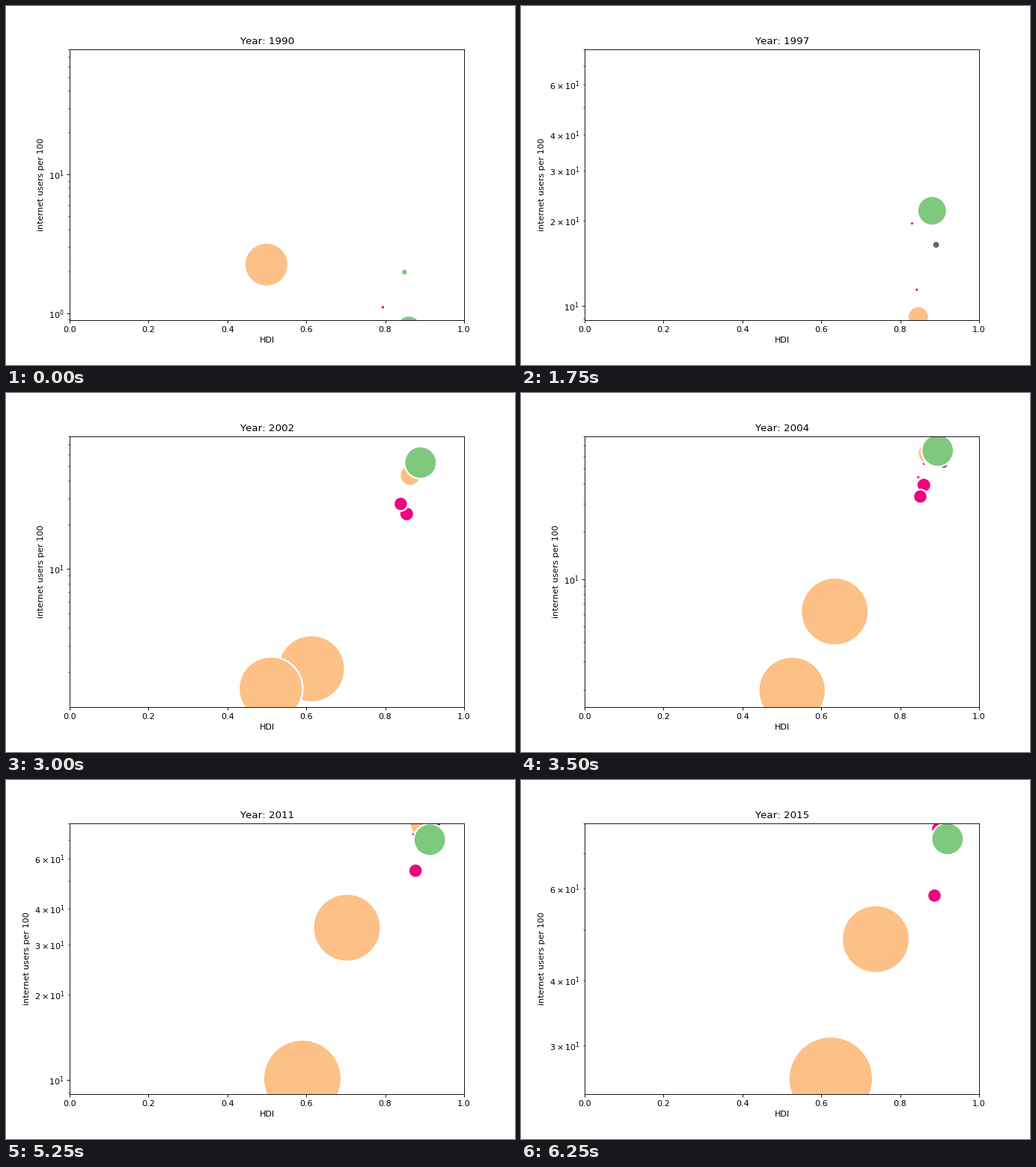
These frames come from a looping animation (680x480 px, 6.5 s). A matplotlib script:

```python
import numpy as np
import matplotlib.pyplot as plt
from matplotlib.animation import FuncAnimation

plt.rcParams["text.kerning_factor"] = 6

FIRST, LAST = 1990, 2015
TOP = 80
PLOT_H = 362
EDGE = 2
GREEN, ORANGE, PINK, GREY = "#7fc97f", "#fdc086", "#f0027f", "#666666"


class Bubble:
    """Follows key points (year, hdi, users); users grow exponentially between."""

    def __init__(self, color, radius, *path, grow=0, cap=99):
        self.color, self.radius, self.grow, self.cap = color, radius, grow, cap
        self.years, self.hdi, users = np.array(path).T
        self.log_users = np.log10(users)

    def spot(self, year):
        x = np.interp(year, self.years, self.hdi)
        y = np.interp(year, self.years, self.log_users,
                      left=np.nan, right=np.nan)
        return x, 10 ** y

    def area(self, year):
        r = min(self.radius + self.grow * (year - self.years[0]), self.cap)
        return (2 * r * 72 / fig.dpi + EDGE) ** 2


# the lowest bubble from 2000 on, it sets the bottom of the axis
lowest = Bubble(ORANGE, 39.5, (2000, .494, .5275), (2002, .51, 1.54),
                (2004, .526, 1.976), (2008, .5626, 4.374),
                (2011, .59, 10.1), (2015, .624, 25.9), grow=1.04)

# drawn from back to front
bubbles = [
    Bubble(GREY, 3.9, (1991, .87, 1.1), (1997, .891, 16.4),
           (2000, .898, 46.8), (2004, .911, 52.5), (2011, .932, 79.5)),
    Bubble(PINK, 1.7, (1990, .794, 1.104)),
    Bubble(PINK, 1.6, (1998, .82, 15.4), (2000, .837, 33.7),
           (2004, .86, 53.5), (2008, .869, 72.9), (2011, .884, 78.7)),
    Bubble(PINK, 1.6, (2004, .846, 43.9)),
    Bubble(GREEN, 3.4, (1990, .849, 1.976)),
    Bubble(ORANGE, 28, (1990, .499, 2.24)),
    Bubble(ORANGE, 43, (2000, .592, .71), (2004, .634, 6.23),
           (2008, .682, 16.05), (2011, .703, 34.3), (2015, .738, 47.95),
           grow=.25, cap=44),
    Bubble(PINK, 1.6, (1994, .825, 1.35), (1997, .842, 11.4),
           (2000, .862, 39.2), (2003, .88, 76)),
    Bubble(PINK, 1.6, (1991, .79, 1.4), (1997, .83, 19.5),
           (2000, .857, 37.2), (2004, .872, 72.4)),
    Bubble(PINK, 8.5, (1998, .843, 6.3), (2000, .849, 14.3),
           (2004, .86, 39.2), (2008, .876, 70.7), (2015, .897, 78)),
    lowest,
    Bubble(PINK, 8.3, (1998, .815, 4.6), (2000, .828, 23.1),
           (2004, .851, 33.2), (2008, .868, 44.5), (2011, .877, 54.4),
           (2015, .887, 58.1)),
    Bubble(ORANGE, 12.7, (1994, .834, .8), (1997, .846, 9.16),
           (2000, .856, 30), (2004, .871, 62.4), (2011, .889, 79)),
    Bubble(GREEN, 15, (1990, .86, .785), (1997, .881, 21.6),
           (2000, .884, 43.1), (2004, .895, 64.8), (2008, .907, 74),
           (2011, .913, 69.9), (2015, .92, 74.6), grow=.5, cap=20.4),
]

fig = plt.figure(figsize=(8.5, 6), dpi=80, facecolor="white")
ax = fig.add_axes([.125, .125, .775, .755])
ax.set_yscale("log")
ax.set_xlim(0, 1)
ax.set_xlabel("HDI")
ax.set_ylabel("internet users per 100")
title = ax.set_title("")
dots = ax.scatter(np.zeros(len(bubbles)), np.ones(len(bubbles)),
                  c=[b.color for b in bubbles], edgecolors="white",
                  linewidths=EDGE)


def bottom(year):
    if year < 2000:
        return 10 ** (-.05 if year < 1995 else .95)
    # a shrinking gap in pixels stays below the lowest bubble's centre
    gap = (20.4 + 9 * np.exp((2000 - year) / 2.6)) / PLOT_H
    low = np.log10(lowest.spot(year)[1])
    return 10 ** ((low - gap * np.log10(TOP)) / (1 - gap))


def update(i):
    year = FIRST + i
    dots.set_offsets(np.ma.masked_invalid([b.spot(year) for b in bubbles]))
    dots.set_sizes([b.area(year) for b in bubbles])
    ax.set_ylim(bottom(year), TOP)
    title.set_text(f"Year: {year}")
    return dots, title


anim = FuncAnimation(fig, update, frames=LAST - FIRST + 1, interval=250,
                     repeat=True, repeat_delay=0, blit=False)
plt.show()
```
